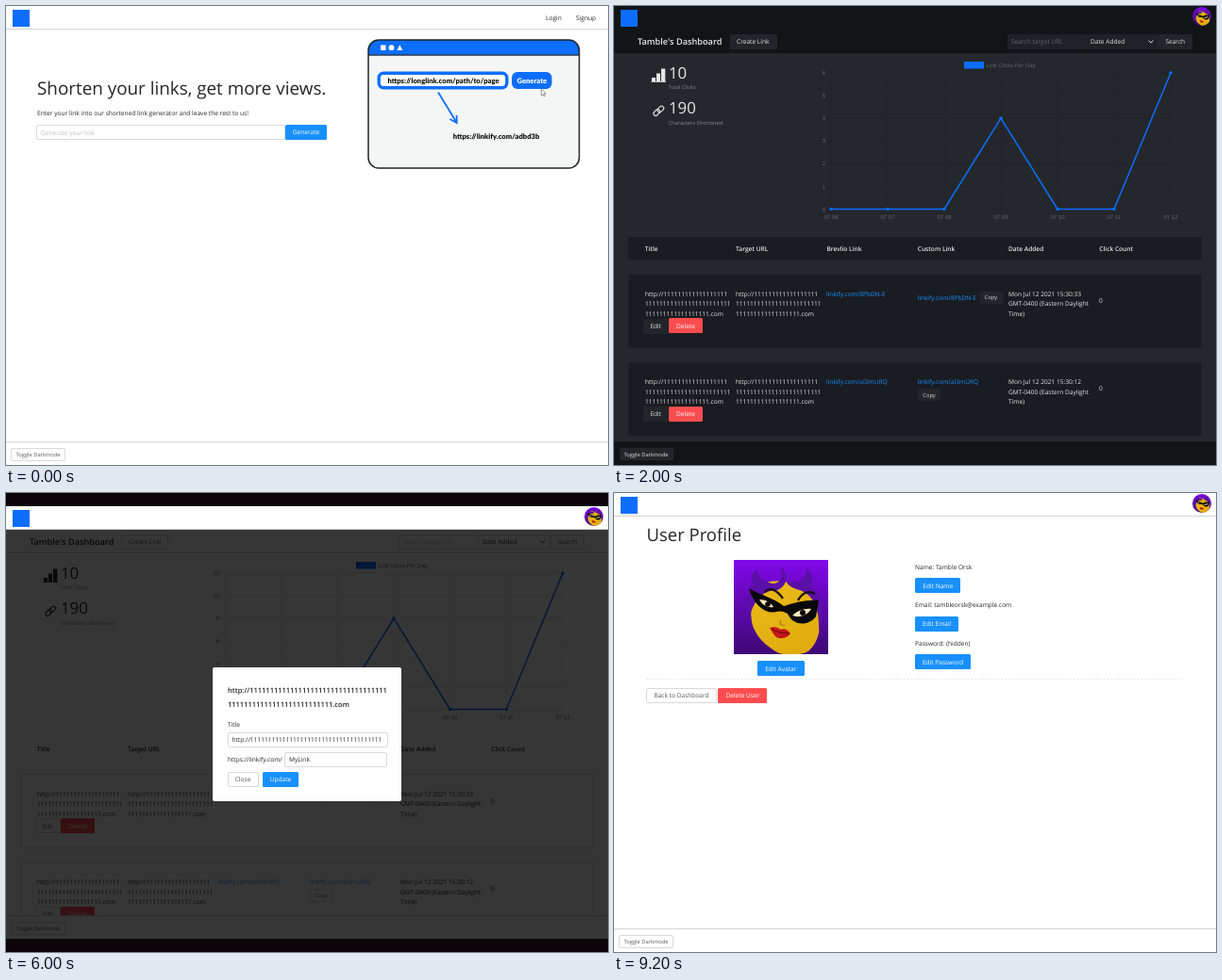
Write an HTML page with a canvas that moves like this. It is 638x487 px and loops after 10 s.

```html
<!DOCTYPE html>
<html lang="en">
<head>
<meta charset="utf-8">
<title>Link shortener tour</title>
<style>
html, body { margin: 0; width: 100%; height: 100%; overflow: hidden; background: #fff; }
canvas { display: block; }
</style>
</head>
<body>
<canvas id="stage" width="638" height="487"></canvas>
<script>
const ctx = document.getElementById('stage').getContext('2d');
const W = 638, H = 487, HOLD = 2000;
const UI = '"Open Sans", "Noto Sans", sans-serif';
const CHART = '"Liberation Sans", Arial, sans-serif';
const HAND = 'Lato, "Open Sans", sans-serif';
const BRAND = '#0d6efd', BLUE = '#1890ff', RED = '#ff4d4f';

const LIGHT = {
  page: '#fff', bar: '#fff', panel: '#fff', field: '#fff', button: '#fff',
  edge: '#d9d9d9', rule: '#d4d4d4', text: '#262626', soft: '#595959',
  dim: '#8c8c8c', hint: '#bfbfbf', grid: '#e3e3e3', axis: '#666'
};
const DARK = {
  page: '#24272c', bar: '#121518', panel: '#191c21', field: '#1e2125', button: '#22262a',
  edge: null, rule: null, text: '#e6e6e6', soft: '#e0e0e0',
  dim: '#83868a', hint: '#63666a', grid: '#212429', axis: '#666'
};

let theme = LIGHT;

// y is the middle of the capitals
function text(str, x, y, { size = 6.6, color = theme.text, weight = 400, align = 'left', family = UI } = {}) {
  ctx.font = `${weight} ${size}px ${family}`;
  ctx.textAlign = align;
  ctx.fillStyle = color;
  ctx.fillText(str, x, y + size * 0.357);
}

function rect(x, y, w, h, color) {
  ctx.fillStyle = color;
  ctx.fillRect(x, y, w, h);
}

function box(x, y, w, h, fill, edge, r = 1.5, line = 1) {
  ctx.beginPath();
  ctx.roundRect(x, y, w, h, r);
  if (fill) { ctx.fillStyle = fill; ctx.fill(); }
  if (edge) { ctx.strokeStyle = edge; ctx.lineWidth = line; ctx.stroke(); }
}

// box whose sides sit on whole pixels
function control(x, y, w, h, fill, edge) {
  const half = edge ? 0.5 : 0, size = edge ? Math.floor : Math.ceil;
  box(Math.round(x - half) + half, Math.round(y - half) + half, size(w), size(h), fill, edge);
}

function button(label, x, y, w, h, fill, size = 6.6) {
  control(x, y, w, h, fill || theme.button, fill ? null : theme.edge);
  text(label, x + w / 2, y + h / 2, { size, align: 'center', color: fill ? '#fff' : theme.soft });
}

function line(points, color, width = 1) {
  ctx.beginPath();
  points.forEach(([x, y]) => ctx.lineTo(x, y));
  ctx.strokeStyle = color;
  ctx.lineWidth = width;
  ctx.stroke();
}

function dot(x, y, r, color) {
  ctx.beginPath();
  ctx.arc(x, y, r, 0, Math.PI * 2);
  ctx.fillStyle = color;
  ctx.fill();
}

function shape(d, color) {
  ctx.fillStyle = color;
  ctx.fill(new Path2D(d));
}

function stroke(d, color, width) {
  ctx.strokeStyle = color;
  ctx.lineWidth = width;
  ctx.stroke(new Path2D(d));
}

// masked face on a 100 by 100 field
function portrait(x, y, size, round) {
  ctx.save();
  ctx.translate(x, y);
  ctx.scale(size / 100, size / 100);
  ctx.beginPath();
  if (round) ctx.arc(50, 50, 50, 0, Math.PI * 2);
  else ctx.rect(0, 0, 100, 100);
  ctx.clip();
  const back = ctx.createLinearGradient(0, 0, 0, 100);
  back.addColorStop(0, '#8208ea');
  back.addColorStop(1, '#3d0873');
  rect(0, 0, 100, 100, back);
  const skin = ctx.createLinearGradient(20, 10, 70, 100);
  skin.addColorStop(0, '#ecbd1a');
  skin.addColorStop(1, '#e0ab0e');
  shape('M24 27C36 20 62 22 78 28C89 36 93 48 92 60C91 76 90 86 80 96C74 101 58 102 48 99C34 92 22 80 19 66C17 50 18 36 24 27Z', skin);
  shape('M17 60C11 42 15 30 22 26C16 22 18 14 25 10C24 19 33 22 40 25C50 26 53 17 49 6C59 15 57 28 46 32C33 32 22 40 17 60Z', '#5a0fa6');
  shape('M55 22C67 26 76 22 78 8C85 18 84 25 81 29C94 36 98 56 90 76C91 54 86 38 70 32C62 30 57 27 55 22Z', '#5a0fa6');
  stroke('M33 34C38 28 46 32 52 41M68 43C72 35 79 32 86 36', '#1a0b14', 2.2);
  shape('M16 30C27 37 42 40 53 49C65 45 78 42 90 43L87 60C80 70 63 71 57 57C52 54 48 54 45 55C35 58 22 50 16 30Z', '#090708');
  shape('M27 42C34 42 39 45 42 50C36 51 30 48 27 42Z', '#f5e7bb');
  shape('M62 59C67 54 75 51 82 52C78 59 69 62 62 59Z', '#f5e7bb');
  dot(36, 47, 2.8, '#090708');
  dot(73, 56, 3, '#090708');
  stroke('M50 64C48 68 50 70 54 69', '#a87809', 1.2);
  shape('M38 72C44 70 47 72 50 74C53 72 57 74 60 78C56 84 47 85 43 80Z', '#c5141c');
  stroke('M40 73C46 77 52 78 59 78', '#65070d', 1);
  ctx.restore();
}

function header(withAvatar) {
  rect(0, 0, W, 25, theme.bar);
  if (theme.rule) rect(0, 24, W, 1, theme.rule);
  rect(7, 4, 18, 18, BRAND);
  if (withAvatar) portrait(613, 1, 20, true);
}

function footer(top = 462) {
  rect(0, top, W, 25, theme.bar);
  if (theme.rule) rect(0, top, W, 1, theme.rule);
  button('Toggle Darkmode', 5.5, top + 7, 57, 13, null, 5.75);
}

function illustration() {
  const ink = '#20262b';
  box(384, 36, 223.5, 136, '#f4f6f6', null, 11);
  ctx.save();
  ctx.beginPath();
  ctx.roundRect(384, 36, 223.5, 136, 11);
  ctx.clip();
  rect(384, 36, 224, 16, BRAND);
  rect(384, 51.5, 224, 1.2, ink);
  ctx.restore();
  box(384, 36, 223.5, 136, null, ink, 11, 1.5);
  rect(397, 41.5, 5.5, 5.5, '#fff');
  dot(408.5, 44.2, 2.9, '#fff');
  shape('M417.3 41.2L420.3 47H414.3Z', '#fff');

  const hand = { family: HAND, weight: 900, size: 7.6, align: 'center', color: '#111' };
  box(395.2, 71.2, 135.6, 15.6, '#fff', BRAND, 5, 3.4);
  text('https://longlink.com/path/to/page', 463.5, 79, hand);
  box(536, 70, 42.5, 18, BRAND, null, 6);
  text('Generate', 557.3, 79, { ...hand, color: '#fff' });
  line([[458, 91.5], [477.5, 123.5]], BRAND, 1.8);
  line([[470.5, 120], [477.7, 124], [477.6, 116]], BRAND, 1.8);
  text('https://linkify.com/adbd3b', 519.5, 138, hand);

  const arrow = 'M567.3 87.5V95L569 93.5L570.1 96L571.2 95.5L570.1 93H572.3Z';
  shape(arrow, '#fff');
  stroke(arrow, '#555', 0.6);
}

function home() {
  header(false);
  text('Login', 572, 12.8);
  text('Signup', 604, 12.8);
  text('Shorten your links, get more views.', 33, 87, { size: 18.85 });
  text('Enter your link into our shortened link generator and leave the rest to us!', 33, 114);
  control(32.5, 126, 263, 15.5, theme.field, theme.edge);
  text('Generate your link', 37, 134.3, { color: theme.hint });
  button('Generate', 296, 126, 44, 16, BLUE);
  illustration();
  footer();
}

function statIcons() {
  rect(40, 76, 4, 4, theme.text);
  rect(45, 71.5, 4, 8.5, theme.text);
  rect(50, 66.5, 4.3, 13.5, theme.text);
  rect(39.5, 79.8, 15.5, 1, theme.text);
  ctx.save();
  ctx.translate(47.3, 111.3);
  ctx.rotate(-Math.PI / 4);
  box(-6.5, -2.5, 7.5, 4.6, null, theme.text, 2.3, 1.1);
  box(-1, -2.1, 7.5, 4.6, null, theme.text, 2.3, 1.1);
  ctx.restore();
}

function chart(values, max, step, left) {
  const right = 590, base = 215.5, top = 71;
  const px = i => left + (right - left) * i / (values.length - 1);
  const py = v => base - (base - top) * v / max;
  const label = { family: CHART, size: 6, color: theme.axis };
  rect(371, 59, 21, 7.5, BRAND);
  text('Link Clicks Per Day', 394.5, 62.5, label);
  for (let v = 0; v <= max; v += step) {
    line([[left - 5, py(v)], [right, py(v)]], theme.grid, 0.6);
    text(String(v), left - 6, py(v), { ...label, align: 'right' });
  }
  values.forEach((v, i) => {
    line([[px(i), top], [px(i), base + 4.5]], theme.grid, 0.6);
    text('07 ' + String(i + 6).padStart(2, '0'), px(i), 224, { ...label, align: 'center' });
  });
  ctx.lineJoin = 'round';
  line(values.map((v, i) => [px(i), py(v)]), BRAND, 1.5);
  values.forEach((v, i) => dot(px(i), py(v), 1.8, BRAND));
}

function paragraph(lines, x, y) {
  lines.forEach((s, i) => text(s, x, y + i * 10.5));
}

const ones = n => '1'.repeat(n);
const longUrl = ['http://' + ones(18), ones(24), ones(18) + '.com'];

function row(top, code, time, wrap) {
  const y = top + 21.5, link = 'linkify.com/' + code;
  box(15.5, top + 0.5, 607, 78, theme.panel, theme.edge);
  paragraph(longUrl, 33, y);
  paragraph(longUrl, 129, y);
  button('Edit', 31, top + 47.5, 26.5, 15.5);
  button('Delete', 58, top + 47.3, 36, 16, RED);
  text(link, 225, y, { color: BLUE });
  text(link, 321.5, wrap ? y : y + 3.8, { color: BLUE });
  if (wrap) button('Copy', 322, top + 28.5, 24, 13, null, 5.75);
  else button('Copy', 387.5, top + 18.5, 24, 13, null, 5.75);
  paragraph(['Mon Jul 12 2021 ' + time, 'GMT-0400 (Eastern Daylight', 'Time)'], 418, y);
  text('0', 514, top + 28.5);
}

function toolbar() {
  rect(0, 25, W, 25, theme.bar);
  if (theme.rule) rect(0, 49, W, 1, theme.rule);
  text("Tamble's Dashboard", 25, 38, { size: 9.2, weight: 600 });
  button('Create Link', 122.5, 30, 49.5, 15.5);
  control(416.5, 30, 84, 15.5, theme.field, theme.edge);
  text('Search target URL', 421, 37.8, { color: theme.hint });
  control(500.5, 30, 76, 15.5, theme.field, theme.edge);
  text('Date Added', 505, 37.8);
  line([[566.5, 36.5], [569, 39], [571.5, 36.5]], theme.soft);
  button('Search', 577, 30, 35.5, 15.5);
}

function dashboard(values, max, step, left) {
  rect(0, 0, W, H, theme.page);
  header(true);
  toolbar();
  statIcons();
  text('10', 58, 71, { size: 16.8 });
  text('Total Clicks', 57.5, 86.3, { size: 5.7, color: theme.dim });
  text('190', 58, 108.5, { size: 16.8 });
  text('Characters Shortened', 57.5, 124.3, { size: 5.7, color: theme.dim });
  chart(values, max, step, left);
  box(15, 245, 608, 24, theme.panel, null);
  ['Title', 'Target URL', 'Brevlio Link', 'Custom Link', 'Date Added', 'Click Count']
    .forEach((s, i) => text(s, 32.8 + i * 96.3, 257.3, { weight: 600 }));
  row(284, '8PbDN-E', '15:30:33', false);
  row(377.5, 'aI3mURQ', '15:30:12', true);
}

function firstDashboard() {
  dashboard([0, 0, 0, 4, 0, 0, 6], 6, 1, 230);
  footer();
}

function modal() {
  box(219, 185, 200, 142, '#fff', null, 2);
  const title = { size: 7.5, weight: 600 };
  text('http://' + ones(34), 235, 209, title);
  text(ones(26) + '.com', 235, 224, title);
  text('Title', 235, 246);
  control(235, 254, 169, 15.5, '#fff', theme.edge);
  text('http://' + ones(37), 239.5, 262);
  text('https://linkify.com/', 235, 283);
  control(295.5, 275, 108, 15.5, '#fff', theme.edge);
  text('MyLink', 300, 283);
  button('Close', 235, 296, 32, 15.5);
  button('Update', 272, 296, 38, 16, BLUE);
}

function editing() {
  ctx.save();
  ctx.translate(0, 14);
  dashboard([0, 0, 0, 8, 0, 0, 12], 12, 2, 232);
  footer(434);
  rect(0, 0, W, H, 'rgba(0,0,0,.79)');
  header(true);
  ctx.restore();
  rect(0, 0, W, 14, '#0c060b');
  rect(0, 473, W, 14, '#0c060b');
  modal();
}

function profile() {
  header(true);
  text('User Profile', 34.5, 44.5, { size: 18.5 });
  portrait(127, 71, 100, false);
  button('Edit Avatar', 152, 178.4, 49.5, 16, BLUE);
  [['Name: Tamble Orsk', 'Edit Name', 48],
   ['Email: tambleorsk@example.com', 'Edit Email', 46],
   ['Password: (hidden)', 'Edit Password', 58.5]].forEach(([info, label, w], i) => {
    const y = 78.6 + i * 40.5;
    text(info, 319, y);
    button(label, 319.2, y + 11.8, w, 16, BLUE);
  });
  ctx.setLineDash([2, 2]);
  line([[34.5, 197.5], [603, 197.5]], '#e6e6e6');
  ctx.setLineDash([]);
  button('Back to Dashboard', 34.5, 207.3, 74, 15.5);
  button('Delete User', 110.4, 207.1, 52, 16, RED);
  footer();
}

const scenes = [
  [LIGHT, home], [DARK, firstDashboard], [LIGHT, firstDashboard],
  [LIGHT, editing], [LIGHT, profile]
];

function frame() {
  const [look, draw] = scenes[Math.floor(performance.now() / HOLD) % scenes.length];
  theme = look;
  ctx.textRendering = 'geometricPrecision';
  rect(0, 0, W, H, theme.page);
  draw();
  requestAnimationFrame(frame);
}
frame();
</script>
</body>
</html>
```
